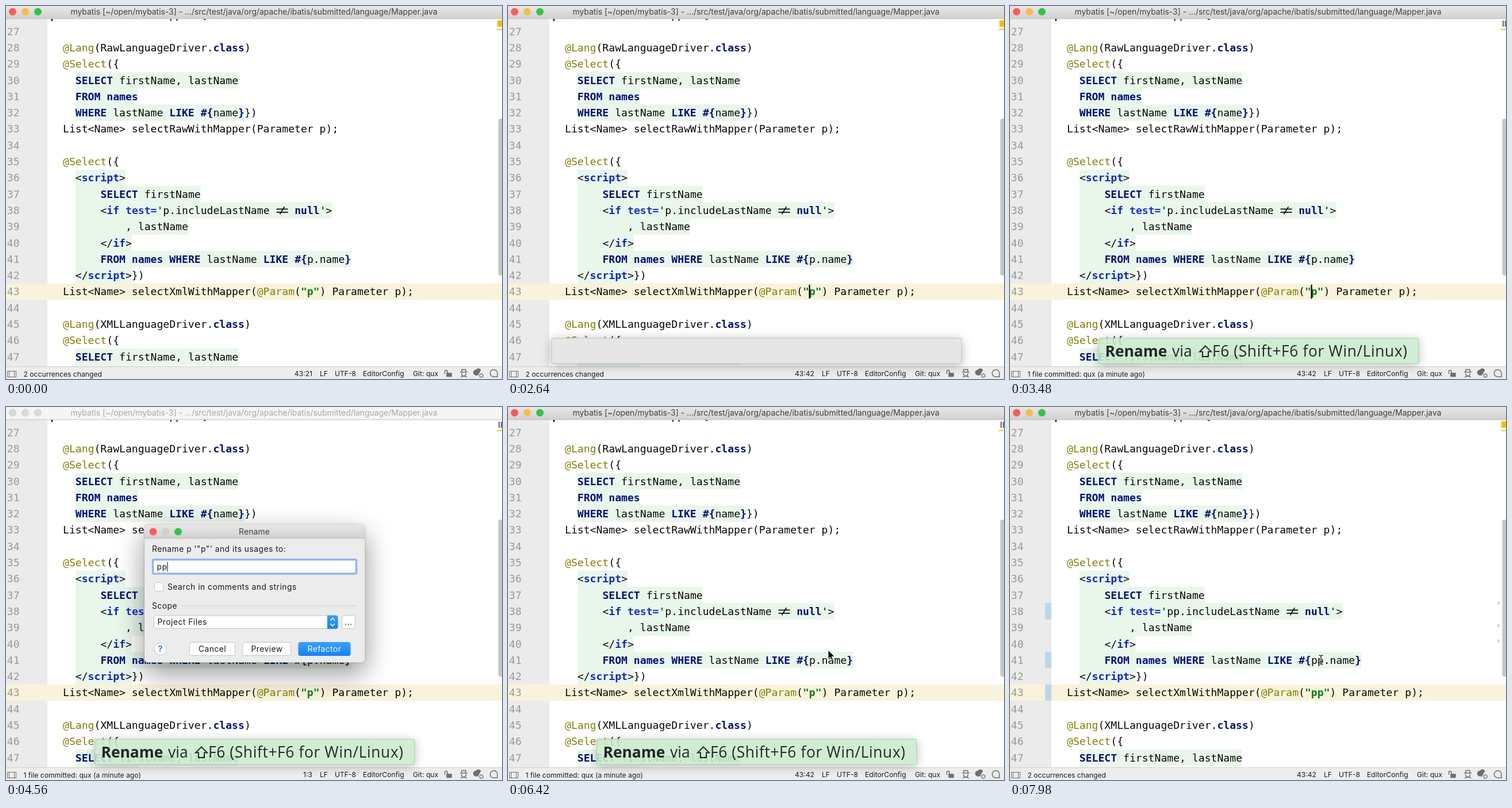
An HTML page that plays this animation: 863 by 649 pixels, repeating every 8000 ms.

```html
<!DOCTYPE html>
<html lang="en">
<head>
<meta charset="utf-8">
<title>Rename refactoring</title>
<style>
html, body { margin: 0; width: 100%; height: 100%; overflow: hidden; background: #fff; }
svg { display: block; width: 863px; height: 649px; }
text { white-space: pre; }
.code { font: 18.1px "DejaVu Sans Mono", monospace; fill: #080808; }
.num { fill: #999; }
.k, .t, .a, .s { font-weight: bold; }
.k { fill: #000f80; }
.t { fill: #0b22dc; }
.a { fill: #1a2fe0; }
.s { fill: #067d17; }
.o { fill: #808000; }
.ui { font: 12.15px Inter, sans-serif; fill: #1c1c1c; }
.dlg { font: 13.8px Inter, sans-serif; fill: #1a1a1a; letter-spacing: .5px; }
.mid { text-anchor: middle; }
.end { text-anchor: end; }
.btn { fill: #fff; stroke: #c3c3c3; }
.icon { fill: none; stroke: #6e6e6e; stroke-width: 1.5; }
.tip { font: 500 26.4px "Open Sans", sans-serif; fill: #0c0f0c; }
.lift { filter: drop-shadow(0 18px 24px rgba(0,0,0,.32)) drop-shadow(0 0 1px rgba(0,0,0,.4)); }
.soft { filter: drop-shadow(0 3px 9px rgba(0,0,0,.28)); }

#blank { animation: blank 8s step-end infinite; }
#tip { animation: tip 8s linear infinite; }
#arrow { animation: arrow 8s ease-in-out infinite; }
#beam { animation: beam 8s ease-in-out infinite; }
@keyframes blank { 0%, 33.75% { opacity: 0 } 32.25% { opacity: .5 } 33% { opacity: 1 } }
@keyframes tip {
  0%, 33.7% { opacity: 0 }
  33.75% { opacity: .35 }
  36%, 90% { opacity: .89 }
  93.75%, 100% { opacity: 0 }
}
@keyframes arrow {
  0%, 66% { transform: translate(470px, 330px) }
  74%, 100% { transform: translate(557px, 423px) }
}
@keyframes beam {
  0%, 88% { transform: translate(558px, 425px) }
  95%, 100% { transform: translate(541px, 440px) }
}
</style>
</head>
<body>
<svg viewBox="0 0 863 649">
  <rect width="863" height="649" fill="#fff"/>
  <rect width="72" height="649" fill="#ebebeb"/>
  <rect y="482.7" width="863" height="28.3" fill="#f9f3dc"/>
  <g id="code" class="code"></g>
  <rect class="caret" x="523.5" y="485" width="2.2" height="24"/>

  <rect x="856.5" y="196" width="9" height="273" rx="4" fill="#c6c6c6"/>
  <rect class="warn" x="855" y="25" width="8" height="11" fill="#f2bf02"/>
  <path class="wait" d="M858 25.5v10.5M862 25.5v10.5" stroke="#6e6e6e" stroke-width="2.2"/>
  <rect x="854" y="40" width="9" height="2" fill="#ecc93c"/>
  <path class="new" d="M848.5 341h3M848.5 380.5h3M848.5 407h3" stroke="#b3cdf0" stroke-width="5"/>

  <!-- status bar -->
  <rect y="627" width="863" height="22" fill="#ededed"/>
  <path d="M0 627.5h863" stroke="#d0d0d0"/>
  <path class="icon" d="M2.5 635.5h15v10h-15zM5.5 635.5v10M14.5 635.5v10" style="stroke-width:1"/>
  <g class="ui">
    <text class="changed" x="30.5" y="644.5">2 occurrences changed</text>
    <text class="commit" x="30.5" y="644.5">1 file committed: qux (a minute ago)</text>
    <g class="end">
      <text class="pos1" x="533" y="644">43:21</text>
      <text class="pos2" x="533" y="644">43:42</text>
      <text class="pos3" x="533" y="644">1:2</text>
      <text class="pos4" x="533" y="644">1:3</text>
    </g>
    <text x="546" y="644">LF</text>
    <text x="572" y="644">UTF-8</text>
    <text x="621" y="644">EditorConfig</text>
    <text x="708" y="644">Git: qux</text>
  </g>
  <g class="icon">
    <path d="M763.5 640v-4a2.3 2.3 0 0 1 4.6 0v3"/>
    <rect x="767" y="639" width="8" height="5.5" fill="#6e6e6e"/>
    <path d="M793 636.5v-4h7v4M790 637h13M793 639v3q3.5 4 7 0v-3M791 646q5.5-4 11 0"/>
    <path d="M826 634a4.5 4.5 0 0 0-8-.5a3.5 3.5 0 0 0-.5 8.5h4" fill="#6e6e6e"/>
    <circle cx="827" cy="643" r="3" stroke-width="2" stroke-dasharray="1.8 .8"/>
    <path d="M855 646v-7a6.3 6.3 0 1 0-6.3 6.3h6"/>
  </g>

  <!-- title bar -->
  <defs>
    <linearGradient id="bar" x2="0" y2="1"><stop stop-color="#e7e7e7"/><stop offset="1" stop-color="#d1d1d1"/></linearGradient>
    <linearGradient id="blue" x2="0" y2="1"><stop stop-color="#38a0fc"/><stop offset="1" stop-color="#1083fe"/></linearGradient>
  </defs>
  <g class="active">
    <rect width="863" height="22" fill="url(#bar)"/>
    <circle cx="11.5" cy="10" r="6.5" fill="#fc5b57"/>
    <circle cx="33.5" cy="10" r="6.5" fill="#fdbc40"/>
    <circle cx="55.5" cy="10" r="6.5" fill="#2fc645"/>
  </g>
  <g class="dialog" fill="#dadada" stroke="#cecece">
    <rect width="863" height="22" fill="#f5f5f5" stroke="none"/>
    <circle cx="11.5" cy="10" r="6"/><circle cx="33.5" cy="10" r="6"/><circle cx="55.5" cy="10" r="6"/>
  </g>
  <path d="M0 22h863" stroke="#bcbcbc"/>
  <g id="heading" class="ui mid" style="font-size:13.9px"></g>

  <!-- hint balloons -->
  <g id="blank"><rect class="soft" x="76" y="578" width="713" height="44" rx="2" fill="#e6e6e6" stroke="#c2c2c2"/></g>
  <g id="tip">
    <rect class="soft" x="154.5" y="578" width="556.5" height="44" rx="2" fill="#cbebce" stroke="#a5c8a8"/>
    <g class="tip">
      <text x="165.5" y="610" style="font-weight:bold">Rename</text>
      <text x="282" y="610">via</text>
      <path d="M340 591.5l10 10h-5v8.5h-10v-8.5h-5z" fill="none" stroke="#0c0f0c" stroke-width="2"/>
      <text x="352" y="610" letter-spacing=".6">F6 (Shift+F6 for Win/Linux)</text>
    </g>
  </g>

  <!-- rename dialog -->
  <g class="dialog dlg">
    <rect class="lift" x="241" y="204.5" width="383.5" height="240" rx="5.5" fill="#ececec"/>
    <path d="M241 228.5v-18.5q0-5.5 5.5-5.5h372.5q5.5 0 5.5 5.5v18.5z" fill="url(#bar)"/>
    <path d="M241 228.5h383.5" stroke="#b9b9b9"/>
    <circle cx="256" cy="217" r="6.5" fill="#fc5b57"/>
    <circle cx="278" cy="217" r="6.5" fill="#cfcfcf"/>
    <circle cx="299.5" cy="217" r="6.5" fill="#2fc645"/>
    <text class="mid" x="432" y="222" style="fill:#404040;letter-spacing:.2px">Rename</text>
    <text x="254" y="251.5">Rename p '"p"' and its usages to:</text>
    <rect x="255.5" y="265.5" width="354" height="24.5" rx="2" fill="#fff" stroke="#8ab9f3" stroke-width="3.5"/>
    <rect class="sel" x="262" y="269" width="10" height="18" fill="#b3d7ff"/>
    <text class="one" x="262.5" y="283">p</text>
    <text class="two" x="262.5" y="283">pp</text>
    <path class="one" d="M272 269.5v17" stroke="#000"/>
    <path class="two" d="M281 269.5v17" stroke="#000"/>
    <rect class="btn" x="258.5" y="305.5" width="15" height="15" rx="3"/>
    <text x="281" y="318">Search in comments and strings</text>
    <text x="254" y="350.5">Scope</text>
    <path d="M305 346h303" stroke="#cdcdcd"/>
    <rect class="btn" x="257.5" y="363" width="319.5" height="22.5" rx="3"/>
    <path d="M559 362.5h15q3.5 0 3.5 3.5v16.5q0 3.5-3.5 3.5h-15z" fill="url(#blue)"/>
    <path d="M564.5 371.5l3.7-4 3.7 4M564.5 377l3.7 4 3.7-4" fill="none" stroke="#fff" stroke-width="1.6"/>
    <text x="263.5" y="379">Project Files</text>
    <rect class="btn" x="584.5" y="363" width="23" height="22.5" rx="3"/>
    <text class="mid" x="596" y="379">...</text>
    <circle class="btn" cx="268.5" cy="421" r="10.5"/>
    <text class="mid" x="268.7" y="426.3" style="fill:#1a78e8;font-weight:600;font-size:15px">?</text>
    <rect class="btn" x="319.5" y="409.5" width="79" height="23" rx="3"/>
    <text class="mid" x="359" y="426">Cancel</text>
    <rect class="btn" x="412" y="409.5" width="83.5" height="23" rx="3"/>
    <text class="mid" x="454" y="426">Preview</text>
    <rect x="508.5" y="409" width="91" height="24" rx="3.5" fill="url(#blue)"/>
    <rect class="press" x="508.5" y="409" width="91" height="24" rx="3.5" fill="#0050c8" fill-opacity=".4"/>
    <text class="mid" x="554" y="426" style="fill:#fff">Refactor</text>
  </g>

  <g class="pointer"><path id="arrow" d="M0 0v15.5l3.6-3.3 2.6 5.6 2.6-1.2-2.6-5.4h5z" stroke="#fff"/></g>
  <g class="ibeam"><g id="beam" fill="none">
    <path d="M-3.5-8q3.5 0 3.5 2.5q0-2.5 3.5-2.5M0-6v12M-3.5 8q3.5 0 3.5-2.5q0 2.5 3.5 2.5M-2 3h4" stroke="#fff" stroke-width="3"/>
    <path d="M-3.5-8q3.5 0 3.5 2.5q0-2.5 3.5-2.5M0-6v12M-3.5 8q3.5 0 3.5-2.5q0 2.5 3.5 2.5M-2 3h4" stroke="#222" stroke-width="1.3"/>
  </g></g>
</svg>
<script>
const LOOP = 8000, FIRST = 26, CH = 10.897, ROW = 28.3;
const colX = c => 77.2 + c * CH;
const rowY = n => 44 + (n - 27) * ROW;
const esc = s => s.replace(/</g, '&lt;').replace(/>/g, '&gt;');

// «k text» is a styled token; text before ¦ lies on the injected-language background.
const query = ['    «k SELECT» firstName, lastName¦', '    «k FROM» «k names»¦'];
const select = '  «o @Select»({';
const lines = [
  '«k public» «k interface» Mapper {', '',
  '  «o @Lang»(RawLanguageDriver.«k class»)', select, ...query,
  '    «k WHERE» lastName «k LIKE» «k #{»name«k }»¦})',
  '  List<Name> selectRawWithMapper(Parameter p);', '',
  select,
  '    <«t script»>¦',
  '        «k SELECT» firstName¦',
  "        <«t if» «a test=»«s '»$.includeLastName != «k null»«s '»>¦",
  '            , lastName¦',
  '        </«t if»>¦',
  '        «k FROM» «k names» «k WHERE» lastName «k LIKE» «k #{»$.name«k }»¦',
  '    </«t script»>¦})',
  '  List<Name> selectXmlWithMapper(«o @Param»(«s "$"») Parameter p);', '',
  '  «o @Lang»(XMLLanguageDriver.«k class»)', select, ...query
];

function drawLine(src, n, cls = '') {
  const y = rowY(n), plain = src.replace(/«\w (.*?)»/g, '$1');
  const end = plain.indexOf('¦'), neq = plain.indexOf('!=');
  const indent = src.search(/\S|$/);
  let out = `<g class="${cls}">`;
  if (end > 0) out += `<rect x="${colX(4)}" y="${y - ROW / 2}" width="${(end - 4) * CH}" height="${ROW + .3}" fill="#e9f7ea"/>`;
  if (cls === 'new') out += `<rect x="61" y="${y - ROW / 2}" width="11" height="${ROW}" fill="#bdd6ea"/>`;
  const body = esc(src.trim().replace('¦', '').replace('!=', '\u00a0\u00a0'))
    .replace(/«(\w) (.*?)»/g, '<tspan class="$1">$2</tspan>');
  out += `<text x="${colX(indent)}" y="${y + 6.6}">${body}</text>`;
  if (neq > 0) out += `<path d="M${colX(neq) + 1} ${y - 2}h20M${colX(neq) + 1} ${y + 3.5}h20M${colX(neq) + 7} ${y + 7}l8-13" stroke="#080808" stroke-width="1.7"/>`;
  return out + '</g>';
}

document.getElementById('code').innerHTML = lines.map((src, i) => {
  const n = FIRST + i;
  const text = src.includes('$')
    ? drawLine(src.replace('$', 'p'), n, 'old') + drawLine(src.replace('$', 'pp'), n, 'new')
    : drawLine(src, n);
  return text + `<text class="num" x="1.8" y="${rowY(n) + 6.6}">${n}</text>`;
}).join('');

const heading = 'mybatis [~/open/mybatis-3] - .../src/test/java/org/apache/ibatis/submitted/language/Mapper.java';
document.getElementById('heading').innerHTML =
  `<text class="active" x="431.5" y="15" style="fill:#404040">${heading}</text>
   <text class="dialog" x="431.5" y="15" style="fill:#a9a9a9">${heading}</text>`;

// Times in ms at which each part turns on, off, on ...
const shown = {
  old: [0, 6840], new: [6840],
  caret: [300, 680, 1180, 1680, 2180, 2680, 3180, 3600, 7180, 7680],
  pos1: [0, 300], pos2: [300, 3600, 6120], pos3: [3600, 4380], pos4: [4380, 6120],
  changed: [0, 3060, 6900], commit: [3060, 6900],
  warn: [0, 2820, 6900], wait: [2820, 6900],
  active: [0, 3600, 6120], dialog: [3600, 6120],
  sel: [3600, 4080], one: [3600, 4380], two: [4380, 6120], press: [6000, 6120],
  pointer: [5280, 6900], ibeam: [6900]
};
const sheet = document.createElement('style');
sheet.textContent = Object.entries(shown).map(([name, times]) => {
  const steps = times.map((t, i) => `${t / LOOP * 100}% { opacity: ${1 - i % 2} }`);
  if (times[0]) steps.unshift('0% { opacity: 0 }');
  return `.${name} { animation: ${name} 8s step-end infinite } @keyframes ${name} { ${steps.join(' ')} }`;
}).join('\n');
document.head.append(sheet);
</script>
</body>
</html>
```
